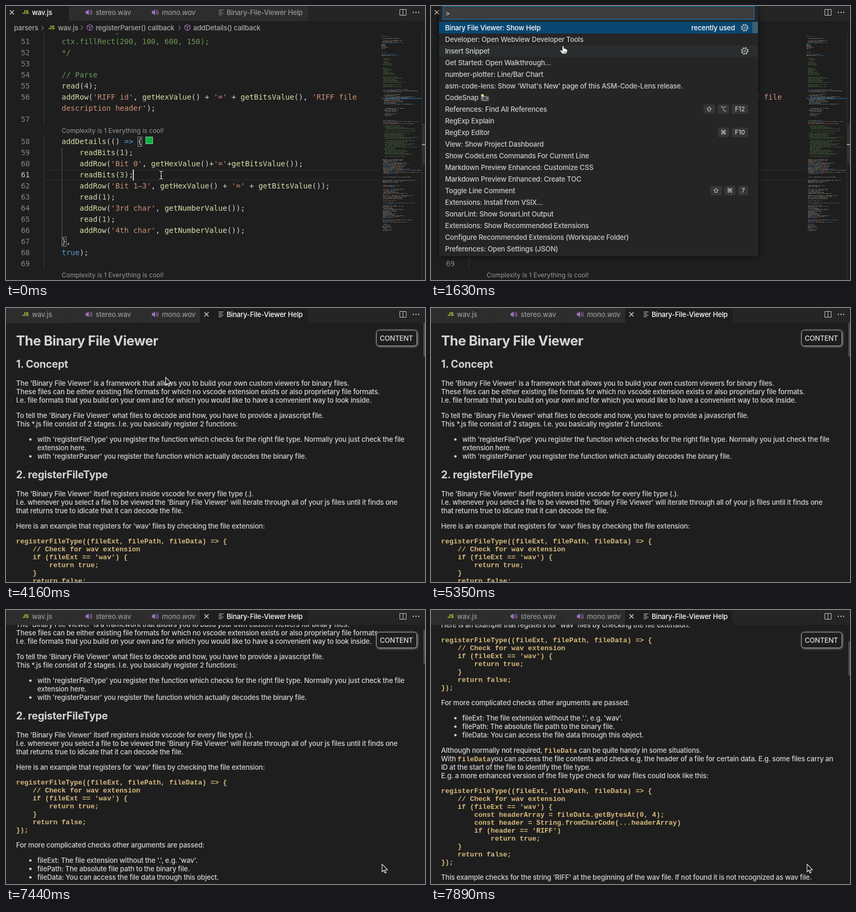
An HTML page that plays this animation: 790 by 518 pixels, repeating every 8 s.

```html
<!DOCTYPE html>
<html lang="en">
<head>
<meta charset="utf-8">
<title>Editor help demo</title>
<style>
html, body { margin: 0; width: 100%; height: 100%; overflow: hidden; background: #1e1e1e; }
svg { display: block; }
text { white-space: pre; font-family: Inter, "Open Sans", "DejaVu Sans", sans-serif; font-weight: 500; letter-spacing: -.19px; }
.lens { font-weight: 400; letter-spacing: 0; }
.h1 { font-weight: 700; letter-spacing: -.48px; }
.h2 { font-weight: 700; letter-spacing: -.2px; }
.it { font-style: italic; }
.code { font-family: "DejaVu Sans Mono", monospace; font-weight: 400; letter-spacing: 0; }
.mono { font-family: "Liberation Mono", monospace; font-weight: 700; letter-spacing: 0; fill: #d7ba7d; }
.key { font-family: Inter, "DejaVu Sans", sans-serif; letter-spacing: 0; }
</style>
</head>
<body>
<svg id="stage" width="790" height="518" viewBox="0 0 790 518"></svg>
<script>
const LOOP = 8000;
const GREEN = '#6a9955', YELLOW = '#dcdcaa', ORANGE = '#ce9178', BLUE = '#569cd6', GREY = '#d4d4d4';

// y is the middle of the capitals
const text = (x, y, s, fill = '#ccc', size = 13, cls = '', anchor = 'start') =>
  `<text x="${x}" y="${(y + size * .36).toFixed(1)}" fill="${fill}" font-size="${size}" class="${cls}" text-anchor="${anchor}">${s}</text>`;
const rect = (x, y, w, h, fill, more = '') =>
  `<rect x="${x}" y="${y}" width="${w}" height="${h}" fill="${fill}" ${more}/>`;
const line = (d, stroke, w = 1, more = '') =>
  `<path d="${d}" fill="none" stroke="${stroke}" stroke-width="${w}" ${more}/>`;
const group = (id, body, more = '') => `<g id="${id}" ${more}>${body}</g>`;

const cross = x => line(`M${x - 4} 8l8 8m0-8l-8 8`, '#e0e0e0', 1.2);
const jsMark = (x, y) => text(x, y, 'JS', '#cbcb41', 9.5, 'h2', 'middle');
const speaker = x => `<path d="M${x - 6} 9.5h2.500l3.500-3v11l-3.500-3h-2.500z" fill="#a074c4"/>` +
  line(`M${x + 2} 9q2 3 0 6m2-8q4 5 0 10`, '#a074c4', 1.2);
const cube = (x, y) => line(`M${x} ${y - 6}l5 2.500v6l-5 3-5-3v-6zm-5 2.500l5 2.500 5-2.500m-5 2.500v6`, '#b180d7');
const gear = (x, y) => `<g fill="none" stroke="#c5c5c5"><circle cx="${x}" cy="${y}" r="6" stroke-width="2" stroke-dasharray="2.700 2.012"/>` +
  `<circle cx="${x}" cy="${y}" r="4.700"/><circle cx="${x}" cy="${y}" r="1.800"/></g>`;

function tabs(helpActive) {
  const bg = on => on ? '#1e1e1e' : '#2d2d2d';
  const fg = on => on ? '#fff' : '#969696';
  return rect(0, 0, 790, 28, '#252526') +
    rect(0, 0, 118, 28.5, bg(!helpActive)) + rect(119, 0, 126, 28, bg(0)) +
    rect(246, 0, 120, 28, bg(0)) + rect(366, 0, 203, 28.5, bg(helpActive)) +
    cross(helpActive ? 378 : 11) + jsMark(37, 12) + text(49, 12, 'wav.js', fg(!helpActive)) +
    speaker(156) + text(169, 12, 'stereo.wav', '#969696') +
    speaker(281) + text(294, 12, 'mono.wav', '#969696', 13, 'it') +
    line('M401 7.500h9m-9 3h6m-6 3h9m-9 3h6', helpActive ? '#d4d4d4' : '#969696', 1.2) +
    text(416, 12, 'Binary-File-Viewer Help', fg(helpActive)) +
    line('M742.500 6.500h12v11h-12zm6 0v11', '#c5c5c5') +
    [768, 773, 778].map(x => `<circle cx="${x}" cy="12" r="1.200" fill="#c5c5c5"/>`).join('');
}

function paint(src) {
  const rule = /^[a-z ]+'|'[^']*'?|\/\/.*|=>|true|[A-Za-z]+(?=\()|\d+/g;
  return src.replace(rule, m => {
    const c = m.startsWith('//') ? GREEN : m.includes("'") ? ORANGE :
      m === '=>' || m === 'true' ? BLUE : /\d/.test(m) ? '#b5cea8' : YELLOW;
    return `<tspan fill="${c}">${m}</tspan>`;
  });
}

function minimap() {
  let seed = 11;
  const rnd = () => (seed = seed * 16807 % 2147483647) / 2147483647;
  const mix = [YELLOW, ORANGE, GREY, BLUE];
  // top, bottom, indent, longest run, is comment
  const blocks = [
    [55, 57, 0, 48, 1], [61, 70, 4, 48, 0], [72, 80, 0, 14, 0], [87, 88, 0, 18, 1], [91, 95, 0, 36, 0],
    [97, 111, 4, 20, 1], [117, 130, 4, 24, 1], [134, 152, 4, 46, 1], [158, 163, 4, 72, 0],
    [167, 186, 8, 58, 0], [191, 208, 8, 40, 0], [216, 222, 4, 72, 0], [226, 250, 8, 66, 1],
    [254, 284, 8, 62, 1], [290, 316, 4, 70, 0], [321, 342, 4, 66, 0], [346, 372, 4, 62, 0],
    [376, 400, 4, 44, 0], [404, 410, 4, 60, 0], [412, 424, 4, 20, 0]];
  let out = '';
  for (const [top, end, indent, max, comment] of blocks)
    for (let y = top; y <= end; y += 2) {
      if (rnd() < .16) continue;
      let x = 708 + indent * (.5 + rnd() * .6), stop = x + max * (.3 + rnd() * .7);
      stop = Math.min(stop, 782);
      while (x < stop) {
        const w = 3 + rnd() * 11;
        const c = comment ? GREEN : mix[Math.floor(rnd() * 4)];
        out += line(`M${x.toFixed(1)} ${y + .5}h${Math.min(w, stop - x).toFixed(1)}`, c, 1, 'stroke-dasharray="3 .6 2 .6"');
        x += w + 1.5;
      }
    }
  return `<g opacity=".55">${out}</g>` + rect(708, 174, 76, 1.5, '#245a8c');
}

function editor() {
  const src = [
    '', '', '', '// Parse', 'read(4);',
    "addRow('RIFF id', getHexValue() + '=' + getBitsValue(), 'RIFF file",
    "description header');", '', null,
    'addDetails(() => {', '    readBits(1);',
    "    addRow('Bit 0', getHexValue()+'='+getBitsValue());", '    readBits(3);',
    "    addRow('Bit 1–3', getHexValue() + '=' + getBitsValue());", '    read(1);',
    "    addRow('3rd char', getNumberValue());", '    read(1);',
    "    addRow('4th char', getNumberValue());", '},', 'true);', '', null];
  let n = 51, out = rect(0, 0, 790, 518, '#1e1e1e');
  out += line('M71.500 50V225M71.500 246V497', '#383838') + line('M105.500 267V435', '#585858');
  out += line('M72 310H706M72 329H706', '#2b2b2b', 1.5);
  out += rect(248.5, 247.5, 8, 18, '#0640061a', 'stroke="#888"') + rect(105.5, 436.5, 8, 18, '#0640061a', 'stroke="#888"');
  out += text(105, 46, 'ctx.strokeStyle = c;', GREEN, 14, 'code') +
    text(105, 67, 'ctx.fillRect(200, 100, 600, 150);', GREEN, 14, 'code') + text(105, 88, '*/', GREEN, 14, 'code');
  src.forEach((s, i) => {
    const y = 67 + i * 21;
    if (s === null) { out += text(105, y + 1, 'Complexity is 1 Everything is cool!', '#999', 12, 'lens'); return; }
    if (i !== 6) {
      out += text(45, y, n, n === 61 ? '#c6c6c6' : '#858585', 14, 'code', 'end');
      n++;
    }
    out += text(105, y, paint(s), GREY, 14, 'code');
  });
  out += rect(263.5, 247.5, 13, 13, '#00b43c', 'stroke="#9bbfa5"');
  out += rect(0, 28, 790, 23.5, '#1e1e1e');
  const crumb = '#a9a9a9', arrow = x => line(`M${x - 2} 37l4 4-4 4`, crumb);
  out += text(15, 41, 'parsers', crumb) + arrow(69) + jsMark(86, 41) + text(98, 41, 'wav.js', crumb) + arrow(143) +
    cube(158, 41) + text(169, 41, 'registerParser() callback', crumb) + arrow(327) +
    cube(342, 41) + text(353, 41, 'addDetails() callback', crumb);
  out += minimap() + line('M784.500 51V518', '#333') + rect(785, 222, 5, 78, '#79797933') + rect(784, 261, 6, 2, '#a0a0a0');
  return out + tabs(false) + rect(239, 309, 2, 21, '#d0d0d0', 'id="caret"');
}

function palette() {
  const rows = ['Binary File Viewer: Show Help', 'Developer: Open Webview Developer Tools', 'Insert Snippet',
    'Get Started: Open Walkthrough...', 'number-plotter: Line/Bar Chart',
    "asm-code-lens: Show 'What's New' page of this ASM-Code-Lens release.", 'CodeSnap',
    'References: Find All References', 'RegExp Explain', 'RegExp Editor', 'View: Show Project Dashboard',
    'Show CodeLens Commands For Current Line', 'Markdown Preview Enhanced: Customize CSS',
    'Markdown Preview Enhanced: Create TOC', 'Toggle Line Comment', 'Extensions: Install from VSIX...',
    'SonarLint: Show SonarLint Output', 'Extensions: Show Recommended Extensions',
    'Configure Recommended Extensions (Workspace Folder)', 'Preferences: Open Settings (JSON)'];
  const key = (x, y, w, s) => rect(x, y - 9, w, 18, '#80808030', 'rx="3"') + text(x + w / 2, y, s, '#ccc', 11.5, 'key', 'middle');
  return rect(15, -10, 602, 483, '#252526', 'style="filter:drop-shadow(0 0 4px #000a)"') +
    rect(22, 0, 588, 26, '#3c3c3c') + rect(22.5, .5, 587, 25, 'none', 'id="focus" stroke="#007fd4"') +
    text(27, 14, '&gt;') + rect(36, 5, 1, 17, '#ddd', 'id="typing"') +
    group('hover', rect(15, -11, 602, 22, '#2a2d2e') + gear(591.5, 0)) +
    rect(15, 30, 602, 22, '#094771') + rect(15.5, 30.5, 601, 21, 'none', 'id="picked" stroke="#007fd4"') +
    rows.map((s, i) => text(26.5, 41 + i * 22, s, i ? '#ccc' : '#fff')).join('') +
    text(573, 41, 'recently used', '#fff', 13, '', 'end') + gear(591.5, 41) + rect(606, 30, 10, 21, '#79797980') +
    rect(94, 170, 15, 10, '#5c5c60', 'rx="1.500"') + rect(94, 173, 15, 2, '#a8845c') +
    '<circle cx="101.500" cy="175" r="3.500" fill="#2c3a48" stroke="#bbb"/><circle cx="97" cy="169" r="2.500" fill="#ffe9a0"/>' +
    key(514, 195, 21, '⇧') + key(540.5, 195, 22, '⌥') + key(567, 195, 31, 'F12') +
    key(541, 239, 21, '⌘') + key(567, 239, 31, 'F10') +
    key(526.5, 349, 22, '⇧') + key(553, 349, 21, '⌘') + key(579, 349, 19, '7');
}

function helpPage() {
  const ink = '#d4d4d4';
  const para = (y, ...ls) => ls.map((s, i) => text(19, y + i * 16, s, ink)).join('');
  const item = (y, s) => `<circle cx="46" cy="${y + .5}" r="2.300" fill="${ink}"/>` + text(59, y, s, ink);
  const block = (y, ...ls) => ls.map((s, i) => text(19, y + i * 15.05, s, '#d7ba7d', 13, 'mono')).join('');
  const data = '<tspan class="mono">fileData</tspan>';
  const start = ['registerFileType((fileExt, filePath, fileData) => {', '    // Check for wav extension', "    if (fileExt == 'wav') {"];
  const end = ['    }', '    return false;', '});'];
  return text(19, 62, 'The Binary File Viewer', ink, 25.5, 'h1') + text(19, 106, '1. Concept', ink, 19.5, 'h2') +
    para(142, "The 'Binary File Viewer' is a framework that allows you to build your own custom viewers for binary files.",
      'These files can be either existing file formats for which no vscode extension exists or also proprietary file formats.',
      'I.e. file formats that you build on your own and for which you would like to have a convenient way to look inside.') +
    para(203, "To tell the 'Binary File Viewer' what files to decode and how, you have to provide a javascript file.",
      'This *.js file consist of 2 stages. I.e. you basically register 2 functions:') +
    item(248, "with 'registerFileType' you register the function which checks for the right file type. Normally you just check the file") +
    text(59, 264, 'extension here.', ink) +
    item(280, "with 'registerParser' you register the function which actually decodes the binary file.") +
    text(19, 315, '2. registerFileType', ink, 19.5, 'h2') +
    para(351, "The 'Binary File Viewer' itself registers inside vscode for every file type (.).",
      "I.e. whenever you select a file to be viewed the 'Binary File Viewer' will iterate through all of your js files until it finds one",
      'that returns true to idicate that it can decode the file.') +
    para(412, "Here is an example that registers for 'wav' files by checking the file extension:") +
    block(440, ...start, '        return true;', ...end) +
    para(559, 'For more complicated checks other arguments are passed:') +
    item(588, "fileExt: The file extension without the '.', e.g. 'wav'.") +
    item(604, 'filePath: The absolute file path to the binary file.') +
    item(620, 'fileData: You can access the file data through this object.') +
    para(649, `Although normally not required, ${data} can be quite handy in some situations.`,
      `With ${data}you can access the file contents and check e.g. the header of a file for certain data. E.g. some files carry an`,
      'ID at the start of the file to identify the file type.',
      'E.g. a more enhanced version of the file type check for wav files could look like this:') +
    block(725, ...start, '        const headerArray = fileData.getBytesAt(0, 4);',
      '        const header = String.fromCharCode(...headerArray)',
      "        if (header == 'RIFF')", '            return true;', ...end) +
    para(889, "This example checks for the string 'RIFF' at the beginning of the wav file. If not found it is not recognized as wav file.");
}

const help = () => rect(0, 0, 790, 518, '#1e1e1e') + group('page', helpPage()) +
  rect(698.5, 42, 76, 29.5, '#1e1e1e', 'rx="5" stroke="#a8a8a8" style="filter:drop-shadow(1px 1px 2px #ccca)"') +
  text(736, 57, 'CONTENT', '#e0e0e0', 13, '', 'middle') +
  rect(787, 28, 3, 64, '#4f4f4f', 'id="thumb"') + tabs(true);

const beamPath = 'M-3.500-7.500q3 0 3.500 2 .5-2 3.500-2M0-5.500v11M-3.500 7.500q3 0 3.500-2 .5 2 3.500 2M-1.500 2h3';
const pointers =
  group('beam', line(beamPath, '#000', 2.4) + line(beamPath, '#eee', 1.1)) +
  group('hand', '<path d="M-1.500 1.500Q0-1.200 1.500 1.500V5l2 .3 2 .8 1.800 1Q8.500 8 8 10.500L6.500 15.500H-1.500L-5.500 10Q-6.500 7.500-4 8l2.500 2z" fill="#fff" stroke="#222"/>' +
    line('M1.500 11v3M3.500 11v3M5.300 11v3', '#333', .8)) +
  group('arrow', '<path d="M0 0V14.500l3.300-3 2.200 5.200 2.300-1-2.200-5h4.800z" fill="#161616" stroke="#f4f4f4" stroke-width="1.100"/>');

document.getElementById('stage').innerHTML =
  group('editor', editor()) + group('palette', palette()) + group('help', help()) + pointers;
const el = id => document.getElementById(id);

// start time, pointer, x, y
const moves = [
  [0, 'beam', 292.5, 319.5],
  [1190, 'hand', 288, 317], [1340, 'hand', 272, 230], [1490, 'hand', 255, 130], [1630, 'hand', 249, 75],
  [1780, 'hand', 253, 67], [1930, 'hand', 259, 57], [2080, 'hand', 264, 49], [2220, 'hand', 267, 46],
  [3110, 'beam', 266, 46],
  [3860, 'arrow', 272, 66], [4010, 'arrow', 286, 98], [4160, 'arrow', 301, 131], [4310, 'arrow', 348, 195],
  [4460, 'arrow', 412, 266], [4600, 'arrow', 478, 337], [4750, 'arrow', 542, 404], [4900, 'arrow', 591, 452],
  [5050, 'arrow', 628, 483], [5200, 'arrow', 657, 506], [5350, 'none', 0, 0],
  [7150, 'arrow', 717, 487], [7290, 'arrow', 712, 483], [7440, 'arrow', 709, 480.5]];
const scrolls = [[0, 0], [7290, 35], [7440, 115], [7590, 209], [7740, 300], [7890, 384]];

const at = (steps, t) => steps.filter(s => s[0] <= t).pop();
const show = (id, on) => { el(id).style.display = on ? '' : 'none'; };

function draw(t) {
  const [, kind, x, y] = at(moves, t);
  const scroll = at(scrolls, t)[1];
  show('caret', t < 450);
  show('palette', t >= 750 && t < 3110);
  show('help', t >= 3110);
  show('typing', t >= 890 && t < 1190);
  show('focus', t < 2810);
  show('picked', t >= 2810);
  for (const id of ['beam', 'hand', 'arrow']) {
    show(id, id === kind);
    if (id === kind) el(id).setAttribute('transform', `translate(${x} ${y})`);
  }
  const row = Math.floor((y - 30) / 22);
  show('hover', kind === 'hand' && row > 0);
  el('hover').setAttribute('transform', `translate(0 ${41 + row * 22})`);
  el('page').setAttribute('transform', `translate(0 ${-scroll})`);
  el('thumb').setAttribute('y', 28 + scroll * .083);
}

function tick() {
  draw(performance.now() % LOOP);
  requestAnimationFrame(tick);
}
tick();
</script>
</body>
</html>
```
